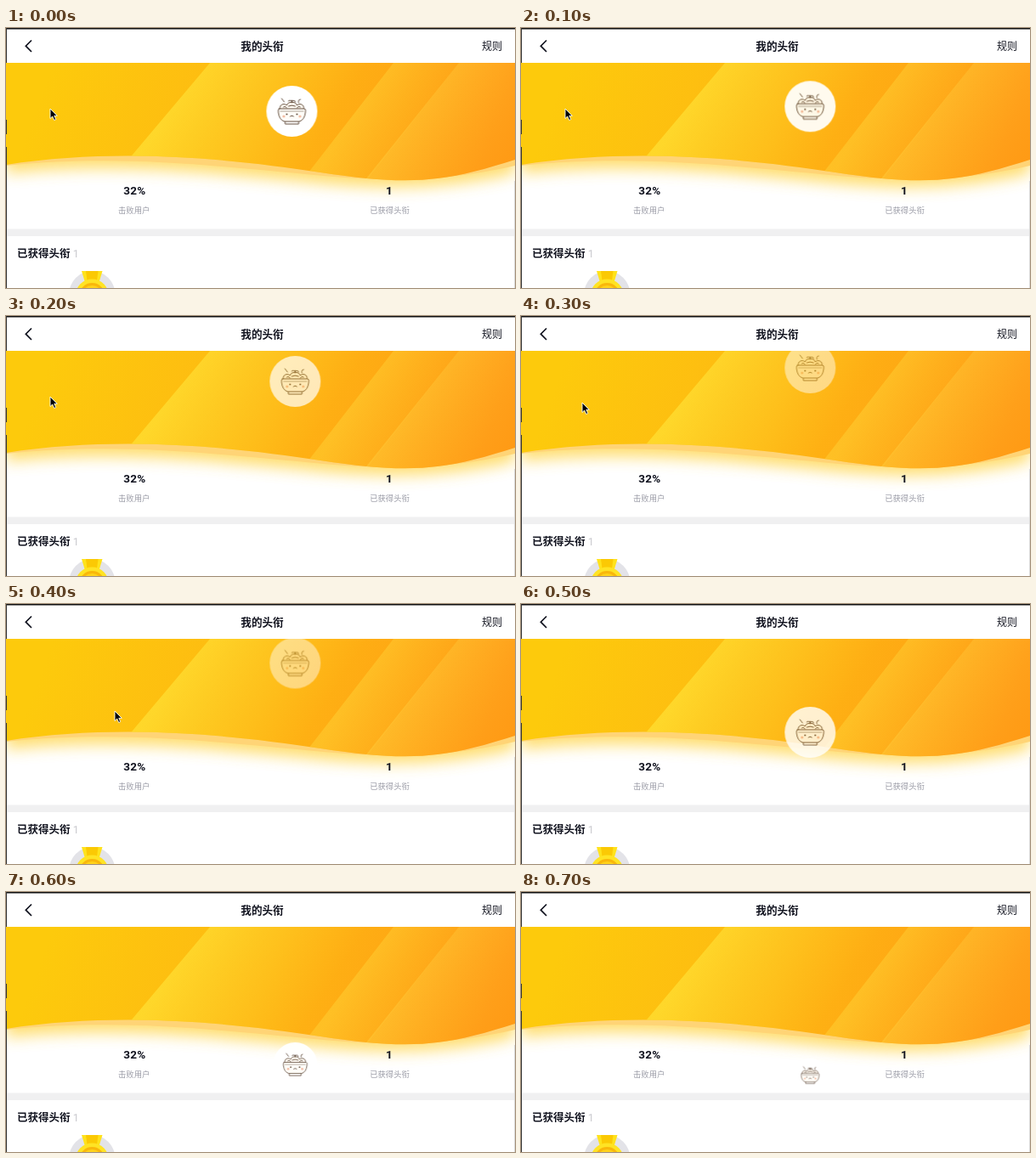
Write an HTML page that moves like this. It is 599 px wide and 306 px high and loops after 0.8 s.

```html
<!DOCTYPE html>
<html lang="zh">
<head>
<meta charset="utf-8">
<title>我的头衔</title>
<style>
html, body { margin: 0; width: 100%; height: 100%; overflow: hidden; background: #fff; }
svg { display: block; width: 599px; height: 306px; }
text { font-family: Roboto, "Noto Sans CJK SC", "Noto Sans CJK", sans-serif; fill: #11131f; }
.mid { text-anchor: middle; }
.bold { font-weight: 700; }
.label { font-size: 9.35px; fill: #9a9ba6; }
.num { font-size: 13.5px; letter-spacing: .2px; }

/* the picture advances once every 100 ms */
.avatar { animation: toss 800ms step-end infinite; }
.cursor { animation: point 800ms step-end infinite; }

@keyframes toss {
  0%    { transform: translate(336.4px, 98px); opacity: 1; }
  12.5% { transform: translate(340.3px, 92.3px); opacity: .93; }
  25%   { transform: translate(340.3px, 77px); opacity: .7; }
  37.5% { transform: translate(340.3px, 61px); opacity: .48; }
  50%   { transform: translate(340.3px, 69.5px); opacity: .45; }
  62.5% { transform: translate(340.3px, 151px); opacity: .8; }
  75%   { transform: translate(340.3px, 203px) scale(.87); opacity: .95; }
  87.5%, 100% { transform: translate(340.3px, 215.5px) scale(.66); opacity: 1; }
}
@keyframes point {
  0%    { transform: translate(52px, 95px); visibility: visible; }
  37.5% { transform: translate(72px, 102px); }
  50%   { transform: translate(128px, 126px); visibility: visible; }
  62.5%, 100% { transform: translate(128px, 126px); visibility: hidden; }
}
</style>
</head>
<body>
<svg viewBox="0 0 599 306">
  <defs>
    <linearGradient id="sun" gradientUnits="userSpaceOnUse" x1="60" y1="30" x2="540" y2="210">
      <stop offset="0" stop-color="#fdca0c"/>
      <stop offset=".5" stop-color="#feb713"/>
      <stop offset="1" stop-color="#ff9a14"/>
    </linearGradient>
    <linearGradient id="ray1" gradientUnits="userSpaceOnUse" x1="190" y1="100" x2="330" y2="190">
      <stop offset="0" stop-color="#ffe53a" stop-opacity=".62"/>
      <stop offset="1" stop-color="#ffd030" stop-opacity="0"/>
    </linearGradient>
    <linearGradient id="ray2" gradientUnits="userSpaceOnUse" x1="410" y1="103" x2="500" y2="160">
      <stop offset="0" stop-color="#ffd83c" stop-opacity=".42"/>
      <stop offset="1" stop-color="#ffc030" stop-opacity="0"/>
    </linearGradient>
    <linearGradient id="ray3" gradientUnits="userSpaceOnUse" x1="480" y1="106" x2="590" y2="180">
      <stop offset="0" stop-color="#ffd040" stop-opacity=".45"/>
      <stop offset="1" stop-color="#ffb030" stop-opacity="0"/>
    </linearGradient>
    <path id="upper" d="M0 41V161C130 141 260 153 370 170S520 180 599 155V41Z"/>
    <path id="lower" d="M0 41V162C110 151 200 158 300 167S480 189 599 162V41Z"/>
    <clipPath id="sky"><use href="#upper"/></clipPath>
    <filter id="soft" filterUnits="userSpaceOnUse" x="-60" y="0" width="720" height="270">
      <feGaussianBlur stdDeviation="9"/>
    </filter>
  </defs>

  <rect width="599" height="306" fill="#fff"/>

  <use href="#lower" y="9" fill="#ffd23c" opacity=".75" filter="url(#soft)"/>
  <use href="#lower" fill="#ffd476"/>
  <use href="#upper" fill="url(#sun)"/>
  <g clip-path="url(#sky)">
    <path d="M240 41L138 162L360 180L455 41Z" fill="url(#ray1)"/>
    <path d="M456 41L356 170L424 180L533 41Z" fill="url(#ray2)"/>
    <path d="M533 41L420 182H599V41Z" fill="url(#ray3)"/>
  </g>

  <text class="mid bold num" x="151.3" y="196.3">32%</text>
  <text class="mid label" x="150.7" y="218.3">击败用户</text>
  <text class="mid bold num" x="451" y="196.3">1</text>
  <text class="mid label" x="451.5" y="218.3">已获得头衔</text>

  <rect y="236.5" width="599" height="8.5" fill="#f0f0f1"/>
  <text class="bold" x="13" y="269.5" font-size="12.5">已获得头衔</text>
  <text x="78.8" y="269.5" font-size="12.5" style="fill:#c9c9ce">1</text>

  <circle cx="101.3" cy="313" r="27" fill="#e3e3e8"/>
  <path d="M89 286H113.500L109 301H93.500Z" fill="#ffe21c"/>
  <path d="M94 286H108.500L106.500 301H96Z" fill="#fbc904"/>
  <circle cx="101.3" cy="315" r="19.500" fill="#ffe324"/>
  <circle cx="101.3" cy="315" r="15" fill="#f9b70b"/>
  <circle cx="101.3" cy="315.500" r="12.500" fill="#ffd21a"/>

  <g class="avatar">
    <circle r="30" fill="#fff"/>
    <g fill="none" stroke="#5f4938" stroke-width=".95" stroke-linecap="round" stroke-linejoin="round">
      <path d="M-14 -3C-15 -8 -9 -10 -6 -7C-5 -12 5 -12 6 -7C9 -10 15 -8 14 -3" fill="#fffaf2"/>
      <path d="M-10 -5Q-8 -7 -6 -4M-4 -6Q0 -8 4 -6M6 -4Q8 -7 10 -5"/>
      <path d="M0 -10V-13M0 -12Q-4 -14 -4 -12M0 -12Q4 -14 4 -11M-9 -11L-12 -15M8 -10Q7 -14 10 -14"/>
      <path d="M-15 -3H15Q16.500 -3 16 1Q15 10 9 12H-9Q-15 10 -16 1Q-16.500 -3 -15 -3Z" fill="#fffdf8"/>
      <path d="M-13.500 0H13.500" stroke-width=".5"/>
      <path d="M-8 12.500V15H8V12.500"/>
      <path d="M-2 6Q0 4 2 6"/>
    </g>
    <g fill="#5f4938"><circle cx="-6" cy="3.500" r="1"/><circle cx="6" cy="3.500" r="1"/></g>
    <g fill="#f3b9a0"><circle cx="-9.500" cy="6" r="1.500"/><circle cx="9.500" cy="6" r="1.500"/></g>
  </g>

  <rect width="599" height="41" fill="#fff"/>
  <path d="M30 14.500L23.300 21.200L30 28" fill="none" stroke="#11131f" stroke-width="1.7"/>
  <text class="mid bold" x="301.500" y="25.700" font-size="12.6">我的头衔</text>
  <text x="560" y="25.500" font-size="12">规则</text>

  <rect width="599" height="1.500" fill="#111"/>
  <path d="M.5 0V41M.5 108V125M.5 140V306" stroke="#333" stroke-width="1"/>
  <path d="M598.500 180V306" stroke="#ddd" stroke-width="1"/>

  <path class="cursor" d="M0 0V11.500L2.700 9L4.700 13.500L6.700 12.600L4.800 8.300H8.300Z" fill="#000" stroke="#fff" stroke-width=".9"/>
</svg>
</body>
</html>
```
